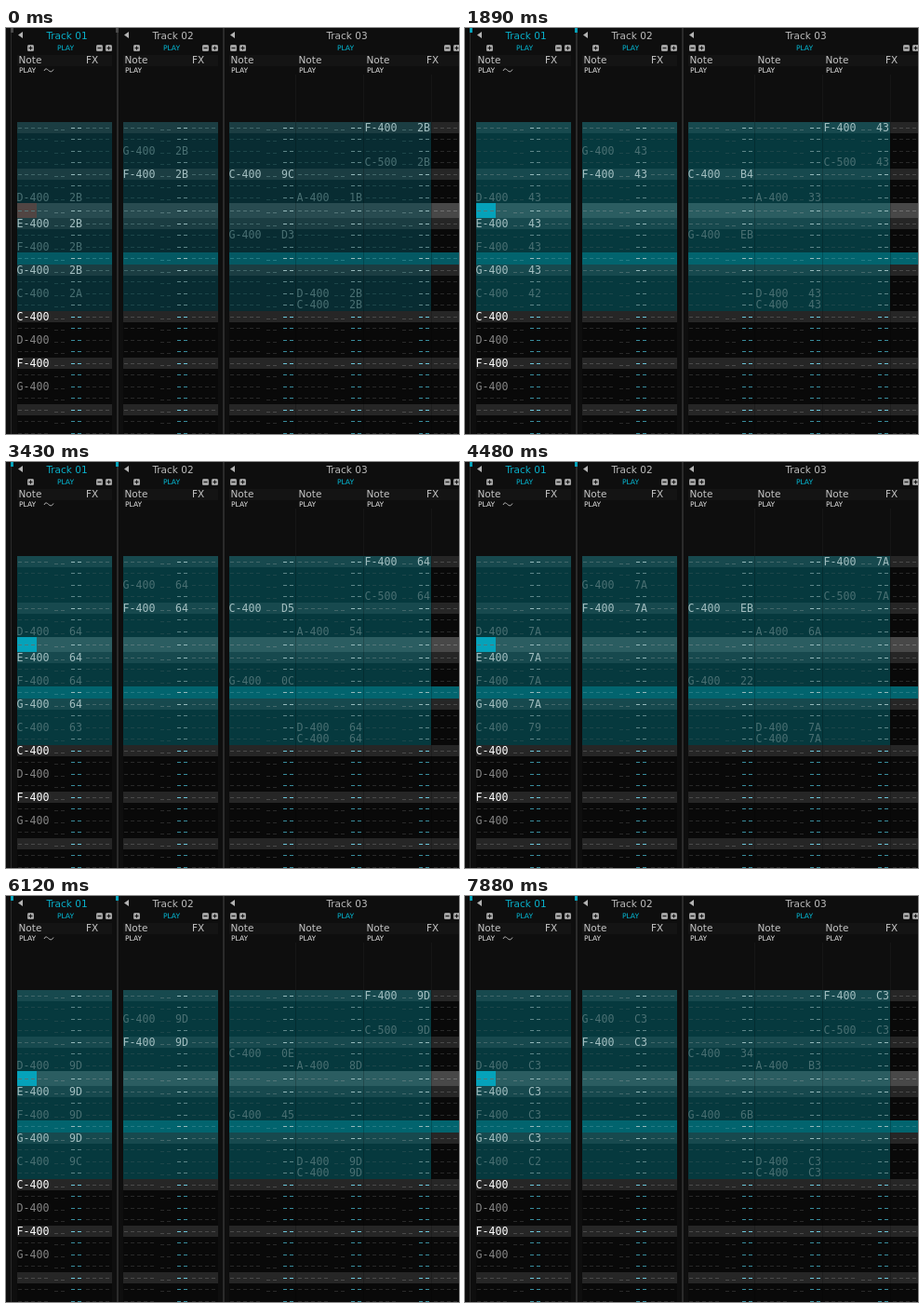
These frames come from a looping animation (487x436 px, 8000 ms). An HTML page with a canvas:

```html
<!DOCTYPE html>
<html lang="en">
<head>
<meta charset="utf-8">
<title>Pattern editor</title>
<style>
  html, body { margin: 0; width: 100%; height: 100%; overflow: hidden; background: #0e0e0e; }
  canvas { display: block; }
</style>
</head>
<body>
<canvas id="stage" width="487" height="436"></canvas>
<script>
const ctx = document.getElementById('stage').getContext('2d');
const LOOP = 8000, FOCUS_AT = 350, BASE = 43;
const ROWS = 27, CURSOR_ROW = 7, PLAY_ROW = 11, SELECTED_ROWS = 16;
const MONO = '11.6px "DejaVu Sans Mono", monospace';
const SANS = '10.5px "DejaVu Sans", sans-serif';
const TINY = '7.6px "DejaVu Sans", sans-serif';

const tracks = [
  { name: 'Track 01', left: 12, right: 114, selected: 114, mid: 65.5, fx: 86 },
  { name: 'Track 02', left: 126, right: 228, selected: 228, mid: 179.5, fx: 200 },
  { name: 'Track 03', left: 240, right: 487, selected: 457, mid: 366.5, fx: 460 }
];

// Each note: row, pitch, delay (none when omitted).
const columns = [
  { x: 12, notes: [[6, 'D-400', 43], [8, 'E-400', 43], [10, 'F-400', 43], [12, 'G-400', 43],
    [14, 'C-400', 42], [16, 'C-400'], [18, 'D-400'], [20, 'F-400'], [22, 'G-400']] },
  { x: 126, notes: [[2, 'G-400', 43], [4, 'F-400', 43]] },
  { x: 240, notes: [[4, 'C-400', 156], [9, 'G-400', 211]] },
  { x: 313, notes: [[6, 'A-400', 27], [14, 'D-400', 43], [15, 'C-400', 43]] },
  { x: 386, notes: [[0, 'F-400', 43], [3, 'C-500', 43]] }
];

const themes = {
  idle: { body: '#082c32', beat: '#1b3d42', cursor: '#284b50', play: '#045963', cell: '#514543', corner: '#4a4a4a' },
  focus: { body: '#06393e', beat: '#17494e', cursor: '#2b5d61', play: '#02646e', cell: '#05a2ba', corner: '#05a2ba' }
};

const rowTop = row => Math.floor(row <= CURSOR_ROW ? 101 + 12.5 * row : 204 + 12.5 * (row - 8));
const rowMid = row => Math.floor((rowTop(row) + rowTop(row + 1)) / 2);
const isBeat = row => row % 4 === 0;
const hex = n => n.toString(16).toUpperCase().padStart(2, '0');

function rect(x, y, w, h, color) {
  ctx.fillStyle = color;
  ctx.fillRect(x, y, w, h);
}

function text(str, x, y, color, font, align = 'left') {
  ctx.font = font;
  ctx.textAlign = align;
  ctx.fillStyle = color;
  ctx.fillText(str, x, y);
}

function dashes(x, y, count, color) {
  for (let i = 0; i < count; i++) rect(x + 1 + i * 7, y, 4, 1, color);
}

function button(x, plus) {
  ctx.fillStyle = '#a2a2a2';
  ctx.beginPath();
  ctx.roundRect(x, 18, 7, 7, 1.5);
  ctx.fill();
  rect(x + 1.5, 21, 4, 1, '#111');
  if (plus) rect(x + 3, 19.5, 1, 4, '#111');
}

function arrow(x) {
  ctx.fillStyle = '#b4b4b4';
  ctx.beginPath();
  ctx.moveTo(x, 7.5);
  ctx.lineTo(x + 5, 4);
  ctx.lineTo(x + 5, 11);
  ctx.fill();
}

function columnLabel(x) {
  text('Note', x + 1.5, 38, '#c4c4c4', SANS);
  text('PLAY', x + 2, 48, '#e6e6e6', TINY);
}

function drawHeader(cornerColor) {
  rect(5, 0, 1, 436, '#2b2b2b');
  for (const x of [119, 233]) rect(x, 0, 2, 436, '#2b2b2b');
  tracks.forEach((track, i) => {
    const { left, mid, fx } = track, wide = i === 2;
    rect(left, 29, track.right - left, 12, '#141414');
    arrow(left + 1);
    text(track.name, mid, 12, i ? '#bcbcbc' : '#08b0ca', SANS, 'center');
    text('PLAY', mid - 1.5, 24, '#04bcd8', TINY, 'center');
    if (wide) {
      button(241, false);
      button(251, true);
    } else button(left + 11, true);
    const end = wide ? 471 : left + 85;
    button(end, false);
    button(end + 10, true);
    text('FX', wide ? 452 : fx, 38, '#c4c4c4', SANS);
  });
  columns.forEach(column => columnLabel(column.x));
  for (const x of [311, 384, 457]) rect(x, 50, 1, 51, '#161616');

  ctx.strokeStyle = '#b0b0b0';
  ctx.lineWidth = 1;
  ctx.beginPath();
  ctx.moveTo(41, 46);
  ctx.bezierCurveTo(44, 39, 47, 52, 51, 44.5);
  ctx.stroke();

  for (const x of [5, 118]) rect(x, 0, 3, 5, cornerColor);
}

function drawRows(theme) {
  for (let row = 0; row < ROWS; row++) {
    const top = rowTop(row), height = rowTop(row + 1) - top;
    for (const { left, right, selected } of tracks) {
      const plain = row === CURSOR_ROW ? '#484848' : isBeat(row) ? '#262626' : '#090909';
      rect(left, top, right - left, height, plain);
      if (row < SELECTED_ROWS) {
        const color = row === CURSOR_ROW ? theme.cursor : isBeat(row) ? theme.beat : theme.body;
        rect(left, top, selected - left, height, color);
      }
      if (row === PLAY_ROW) rect(left, top, right - left, height, theme.play);
    }
  }
  rect(12, rowTop(CURSOR_ROW), 21, rowTop(8) - rowTop(CURSOR_ROW), theme.cell);
  for (const x of [311, 384, 457]) rect(x, 101, 1, 335, 'rgba(0,0,0,.2)');
}

function faintColor(row, selected) {
  if (row === CURSOR_ROW) return selected ? '#547679' : '#707070';
  if (row === PLAY_ROW) return '#267b84';
  if (selected) return isBeat(row) ? '#42676a' : '#1d464a';
  return isBeat(row) ? '#4a4a4a' : '#292929';
}

function delayDashColor(row, selected) {
  const strong = isBeat(row) || row === CURSOR_ROW || row === PLAY_ROW;
  if (selected) return strong ? '#94b8ba' : '#5d8588';
  return strong ? '#6cc6da' : '#398c9c';
}

function drawCells(shift) {
  for (const { x, notes } of columns) {
    // A delay past FF carries the note into the next row.
    const placed = new Map(notes.map(([row, pitch, delay]) => {
      if (delay === undefined) return [row, { pitch }];
      const total = delay + shift;
      return [row + (total >> 8), { pitch, delay: hex(total & 255) }];
    }));
    for (let row = 0; row < ROWS; row++) {
      const y = rowMid(row), base = y + 4;
      const selected = row < SELECTED_ROWS, beat = isBeat(row);
      const faint = faintColor(row, selected), note = placed.get(row);
      const ink = selected ? (beat ? '#a2bec0' : '#496f72') : (beat ? '#fff' : '#858585');
      if (note) text(note.pitch, x - .5, base, ink, MONO);
      else dashes(x, y, 5, faint);
      dashes(x + 39, y + 2, 2, faint);
      if (note && note.delay) text(note.delay, x + 56, base, ink, MONO);
      else dashes(x + 57, y, 2, delayDashColor(row, selected));
    }
  }
  for (const { fx, selected } of tracks) {
    for (let row = 0; row < ROWS; row++)
      dashes(fx - 1, rowMid(row), 4, faintColor(row, row < SELECTED_ROWS && fx < selected));
  }
}

function delayAt(time) {
  if (time < 590) return BASE;
  if (time < 830) return BASE + 1;
  const step = Math.min(60, Math.floor((time - 830) / 117.5 + 1e-6));
  return Math.floor(45 + 2.5 * step);
}

const start = performance.now();

function draw() {
  const time = Math.max(0, performance.now() - start) % LOOP;
  const theme = time < FOCUS_AT ? themes.idle : themes.focus;
  rect(0, 0, 487, 436, '#0e0e0e');
  drawHeader(theme.corner);
  drawRows(theme);
  drawCells(delayAt(time) - BASE);
  requestAnimationFrame(draw);
}

draw();
</script>
</body>
</html>
```
